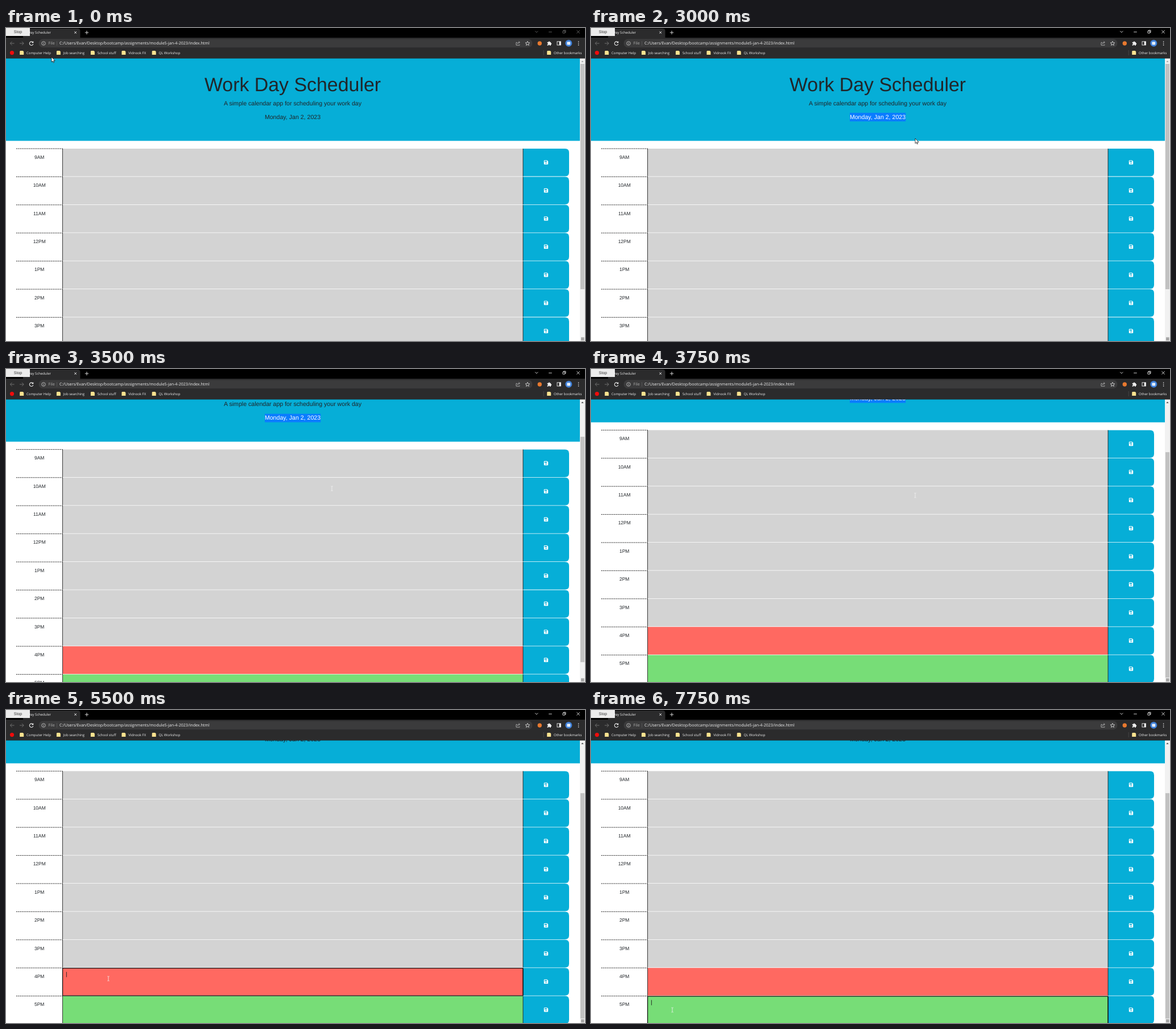
Animation, 1018 px wide and 550 px high, one loop 8 s. Source, as an HTML page:

```html
<!DOCTYPE html>
<html lang="en">
<head>
<meta charset="utf-8">
<title>Work Day Scheduler</title>
<style>
  html, body { margin: 0; width: 100%; height: 100%; overflow: hidden; background: #fff; }
  svg { display: block; width: 1018px; height: 550px; }
  text { text-rendering: geometricPrecision; white-space: pre; }
  .page { font-family: "Liberation Sans", Arial, sans-serif; fill: #212529; text-anchor: middle; }
  .ui { font-family: "Open Sans", "Noto Sans", sans-serif; font-size: 6px; fill: #f1f1f1; }
  .line { fill: none; stroke: #e8e8e8; stroke-width: .9; }
</style>
</head>
<body>
<svg id="stage" viewBox="0 0 1018 550" xmlns="http://www.w3.org/2000/svg"></svg>
<script>
const STEP = 250, LOOP = 8000;
const ROW_TOP = 212, ROW_PITCH = 49.4, CYAN = '#06aed7';
const SELECT_X = 455, SELECT_WIDTH = 98.5;
const SCROLL = [0, 24.8, 70.6, 104.6];
const SCROLL_STEP = 12, ACTIVE_STEP = 6, FOCUS_STEP = 22;

// Pointer position at each step; the last one before a gap is held.
const POINTER = {
  0: [80, 51], 1: [67, 26], 2: [190, 62], 3: [345, 118], 4: [466, 168], 5: [455, 157],
  7: [478, 157], 8: [505, 158], 9: [532, 159], 10: [554, 167], 11: [564, 183], 12: [570, 194],
  13: [574, 204], 14: [573, 210], 15: [570, 222], 16: [528, 258], 17: [440, 315], 18: [345, 370],
  19: [255, 415], 20: [188, 443], 21: [182, 462], 22: [180, 472], 30: [158, 502], 31: [143, 527]
};

const rect = (x, y, w, h, fill, extra = '') =>
  `<rect x="${x}" y="${y}" width="${w}" height="${h}" fill="${fill}" ${extra}/>`;
const circle = (x, y, r, fill, extra = '') =>
  `<circle cx="${x}" cy="${y}" r="${r}" fill="${fill}" ${extra}/>`;
const line = (d, extra = '') => `<path class="line" d="${d}" ${extra}/>`;
const shape = (d, fill, extra = '') => `<path d="${d}" fill="${fill}" ${extra}/>`;
const text = (x, y, str, cls, extra = '') => `<text x="${x}" y="${y}" class="${cls}" ${extra}>${str}</text>`;

function saveIcon(y) {
  return `<g transform="translate(945.8 ${y})">` +
    shape('M.8 0H5.6L7.4 1.8V6.6Q7.4 7.4 6.6 7.4H.8Q0 7.4 0 6.6V.8Q0 0 .8 0Z', '#fff') +
    rect(1.1, 1.1, 4.2, 1.9, CYAN) + circle(3.7, 5.1, 1.05, CYAN) + '</g>';
}

function row(i) {
  const y = ROW_TOP + i * ROW_PITCH, h = ROW_PITCH - .8;
  const hour = (i + 8) % 12 + 1;
  const fill = i < 7 ? '#d3d3d3' : i === 7 ? '#ff6961' : '#77dd77';
  return line(`M18 ${y}H99.5`, 'style="stroke:#111" stroke-dasharray="2.1 1.1"') +
    text(58.7, y + 17.8, hour + (i < 3 ? 'AM' : 'PM'), 'page', 'font-size="8.48"') +
    rect(99.5, y, 809.5, h, fill) +
    shape(`M909 ${y}H983Q990 ${y} 990 ${y + 7}V${y + h - 7}Q990 ${y + h} 983 ${y + h}H909Z`, CYAN) +
    rect(99, y, .9, h, '#222') + rect(908.6, y, .9, h, '#222') + saveIcon(y + 20.4);
}

function page() {
  const date = extra => text(504, 160, 'Monday, Jan 2, 2023', 'page', `font-size="10.6" ${extra}`);
  return rect(0, 53, 1009, 145.3, CYAN) +
    text(504, 111, 'Work Day Scheduler', 'page', 'font-size="33.9"') +
    text(504, 136, 'A simple calendar app for scheduling your work day', 'page', 'font-size="10.6"') +
    date('') +
    `<g id="selected">${rect(SELECT_X, 149, SELECT_WIDTH, 15.3, '#0a7cff')}${date('style="fill:#fff"')}</g>` +
    Array.from({ length: 9 }, (_, i) => row(i)).join('') +
    `<g id="focus">${rect(99.5, .5, 809.5, 48.4, 'none', 'rx="1.2" stroke="#101010" stroke-width="1.3"')}` +
    rect(105.9, 7, .9, 9.2, '#222', 'id="caret"') + '</g>';
}

function scrollbar() {
  return rect(1009, 53, 9, 497, '#f1f1f1') +
    shape('M1011.3 60L1013.5 57.4 1015.7 60Z', '#505050', 'id="up"') +
    rect(1010, 63, 7, 396, '#c1c1c1', 'id="thumb"') +
    rect(1011, 543.5, 5.6, 5.6, '#a6a6a6');
}

function bookmark(x, label) {
  return shape(`M${x - 10} 40H${x - 5.6}L${x - 4} 41.5V47H${x - 11}V41Z`, '#fbe28f', 'transform="translate(-.8 0)"') +
    text(x, 45.7, label, 'ui');
}

function browser() {
  const bar = '#2b2b2c';
  return rect(0, 0, 1018, 53.3, '#000') + rect(0, 17, 1018, 36.3, bar) +
    shape('M30 17V1H126Q130.5 1 130.5 5V17Z', bar) +
    text(79, 10.2, 'Day Scheduler', 'ui', 'text-anchor="end"') +
    rect(0, 0, 42, 14, '#ececec') +
    text(21, 9.2, 'Stop', 'page', 'font-size="7" style="fill:#333"') +
    line('M120.2 6L124 9.8M124 6L120.2 9.8') +
    line('M142 4.8V11.2M138.8 8H145.2', 'stroke-width="1.2"') +
    `<g id="controls">${line('M930.3 5.4L932.8 7.9 935.3 5.4')}${line('M954.2 7H959.8')}` +
    line('M979 5.3H982.7V9H979ZM980.2 5V4H984V7.8H983') + line('M1003.4 4L1008.8 9.4M1008.8 4L1003.4 9.4') + '</g>' +
    line('M14.6 27H7.4M10.6 23.8L7.4 27 10.6 30.2', 'style="stroke:#777"') +
    line('M24 27H31.2M28 23.8L31.2 27 28 30.2', 'style="stroke:#777"') +
    line('M47.2 25.1A3.3 3.3 0 1 0 47.8 28.1', 'style="stroke-width:1.1"') + shape('M48.3 22.9V26.3H44.9Z', '#e8e8e8') +
    rect(57.5, 19.3, 868, 15, '#3b3b3c', 'rx="7.5"') +
    circle(66, 27, 3.3, 'none', 'stroke="#ccc" stroke-width=".8"') +
    rect(65.6, 26.5, .8, 2.4, '#ccc') + rect(65.6, 25, .8, .8, '#ccc') +
    text(74.5, 29.4, 'File', 'ui', 'style="font-size:7.1px;fill:#aaa"') + rect(89.3, 23, .6, 8, '#666') +
    text(94, 29.4, 'C:/Users/Evan/Desktop/bootcamp/assignments/module5-jan-4-2023/index.html', 'ui', 'style="font-size:7.1px"') +
    line('M898.8 25.4H897V30.2H903V28.8M899.2 28Q899.4 25.2 902.7 25.2M901.4 23.4L903.4 25.2 901.4 27', 'style="stroke:#c4c4c4;stroke-width:.8"') +
    line('M917 23.3L918.1 25.8 920.8 26 918.7 27.8 919.4 30.4 917 29 914.6 30.4 915.3 27.8 913.2 26 915.9 25.8Z', 'style="stroke-width:.8"') +
    circle(938.3, 27, 3.7, '#e8792f') +
    shape('M951.7 24.7H953.7A1.3 1.3 0 0 1 956.3 24.7H958V26.4A1.3 1.3 0 0 1 958 29V30.8H956A1.2 1.2 0 0 0 953.6 30.8H951.7V28.9A1.2 1.2 0 0 0 951.7 26.5Z', '#eee') +
    rect(969, 23.8, 6.4, 6.2, 'none', 'stroke="#eee" stroke-width=".9"') + rect(972.6, 23.8, 2.8, 6.2, '#eee') +
    circle(989.3, 26.8, 6, '#3f80d8') + rect(986.4, 24.2, 5.8, 5.2, '#e6effa', 'rx="1"') +
    [24.1, 27, 29.9].map(y => circle(1006.6, y, .8, '#eee')).join('') +
    circle(10.5, 43.6, 3.6, '#f00c0c') +
    bookmark(36, 'Computer Help') + bookmark(100.7, 'Job searching') + bookmark(160.7, 'School stuff') +
    bookmark(215.2, 'Vidnook FX') + bookmark(268.5, 'QL Workshop') +
    rect(944.8, 39, .6, 9, '#555') + bookmark(963, 'Other bookmarks');
}

const stage = document.getElementById('stage');
stage.innerHTML = `<defs><clipPath id="range">${rect(SELECT_X, 149, 0, 15.3, '#000', 'id="rangeBox"')}</clipPath></defs>` +
  rect(0, 0, 1018, 550, '#fff') + `<g id="content">${page()}</g>` + scrollbar() + browser() +
  shape('M0 0V8.8L2 7 3.3 10 4.7 9.4 3.4 6.5H6.2Z', '#fff', 'id="arrow" stroke="#000" stroke-width=".7"') +
  line('M-1.7 -4H-.5L0 -3.5.5 -4H1.7M0 -3.5V3.5M-1.7 4H-.5L0 3.5.5 4H1.7', 'id="beam" style="stroke:#f4f4f4;stroke-width:.8"');

const el = id => document.getElementById(id);
const set = (id, name, value) => el(id).setAttribute(name, value);
const show = (id, on) => set(id, 'visibility', on ? 'inherit' : 'hidden');
set('selected', 'clip-path', 'url(#range)');

function pointerAt(step) {
  while (!POINTER[step]) step--;
  return POINTER[step];
}

function selectedWidth(step, x) {
  if (step < ACTIVE_STEP || step >= FOCUS_STEP) return 0;
  return step < 10 ? x - SELECT_X : SELECT_WIDTH;
}

function render(time) {
  const step = Math.floor(time % LOOP / STEP);
  const [x, y] = pointerAt(step);
  const scroll = SCROLL[Math.max(0, Math.min(3, step - SCROLL_STEP))];
  const isBeam = step > 12 || (step > 4 && step < 10);
  const focusRow = step < 31 ? 7 : 8;

  set('content', 'transform', `translate(0 ${-scroll})`);
  set('thumb', 'y', 63 + scroll * .795);
  set('up', 'fill', scroll ? '#505050' : '#a3a3a3');
  set('controls', 'opacity', step < ACTIVE_STEP ? .45 : 1);
  set('rangeBox', 'width', selectedWidth(step, x));

  set('focus', 'transform', `translate(0 ${ROW_TOP + focusRow * ROW_PITCH})`);
  set('focus', 'visibility', step >= FOCUS_STEP ? 'visible' : 'hidden');
  show('caret', Math.floor((step - FOCUS_STEP) / 2) % 2 === 0);

  for (const id of ['arrow', 'beam']) {
    set(id, 'transform', `translate(${x} ${y})`);
    show(id, isBeam === (id === 'beam'));
  }
}

const start = performance.now();
function tick() {
  render(performance.now() - start);
  requestAnimationFrame(tick);
}
tick();
</script>
</body>
</html>
```
